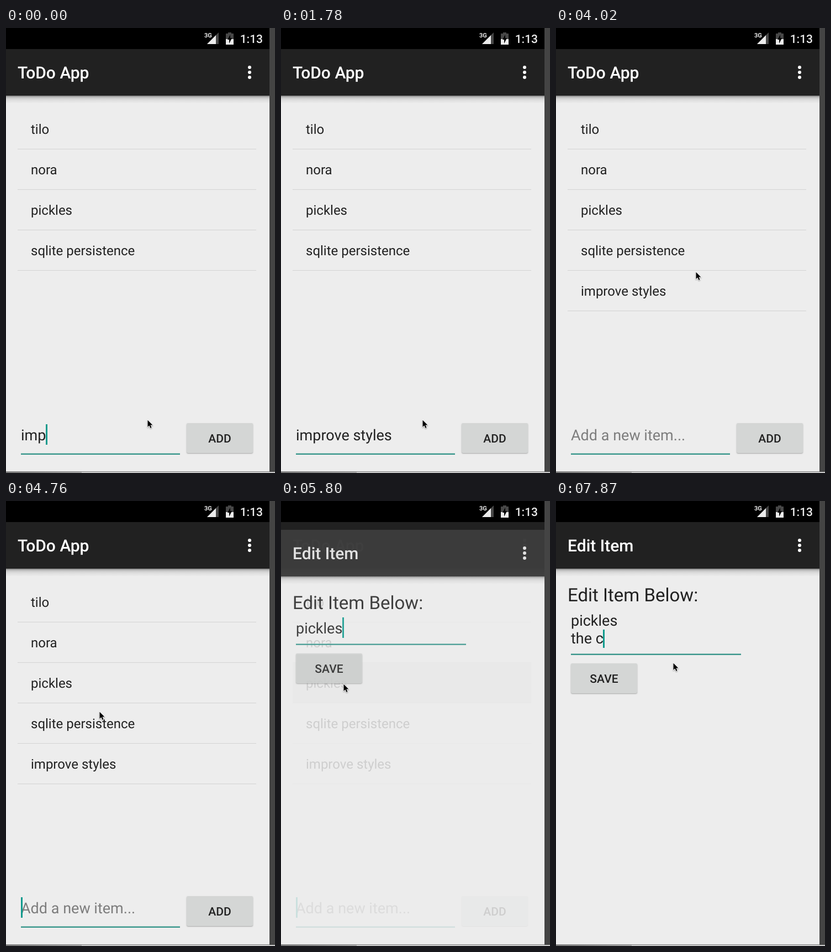
These frames come from a looping animation (487x803 px, 8 s). An HTML page with a canvas:

```html
<!DOCTYPE html>
<html lang="en">
<head>
<meta charset="utf-8">
<title>ToDo App</title>
<style>
html, body { margin: 0; width: 100%; height: 100%; overflow: hidden; background: #444; }
canvas { display: block; }
</style>
</head>
<body>
<canvas id="stage" width="487" height="803"></canvas>
<script>
const ctx = document.getElementById('stage').getContext('2d');
ctx.textRendering = 'geometricPrecision';

const LOOP = 8000, BEAT = 148.5;   // the screen refreshes once per beat
const W = 477, H = 800, ROW = 73, LINE = 32;
const BG = '#ededed', INK = '#212121', TEAL = '#0f9a8d';
const ITEMS = ['tilo', 'nora', 'pickles', 'sqlite persistence', 'improve styles'];

// Moments of the story, in beats
const PRESS = 16, ADDED = 17, TAP = 37, ENTER = 39, OPEN = 40, NEWLINE = 49;
const KEYS = [0, 3, 6, 9, ADDED, OPEN, NEWLINE, 51, 53];

// Pointer legs: start beat, end beat, destination
const HOME = [256, 706];
const LEGS = [
  [12, 15, 377, 734], [22, 25, 253, 439], [28, 32, 169, 379],
  [32, 36, 113, 329], [41, 44, 212, 291]
];

const ramp = (b, from, to) => Math.min(1, Math.max(0, (b - from) / (to - from)));
const mix = (a, b, u) => a + (b - a) * u;

function typedItem(b) {
  if (b >= ADDED) return '';
  return 'improve styles'.slice(0, Math.round(3 + 5 * ramp(b, 0, 3) + 6 * ramp(b, 5, 9)));
}

function editedItem(b) {
  const extra = b < NEWLINE ? 0 : 1 + Math.round(5 * ramp(b, 50, 53));
  return 'pickles\nthe c'.slice(0, 7 + extra).split('\n');
}

// The caret blinks anew after every key press.
function caretOn(b) {
  const last = Math.max(...KEYS.filter(k => k <= b));
  return Math.floor((b - last + 0.7) * 0.3) % 2 === 0;
}

function pointerAt(b) {
  return LEGS.reduce(([x, y], [from, to, toX, toY]) => {
    const u = ramp(b, from, to);
    return [mix(x, toX, u), mix(y, toY, u)];
  }, HOME).map(Math.round);
}

function rect(x, y, w, h, fill) {
  ctx.fillStyle = fill;
  ctx.fillRect(x, y, w, h);
}

function setFont(size, weight = 400) {
  ctx.font = `${weight} ${size}px Roboto, "Noto Sans", sans-serif`;
}

function text(str, x, y, size, { weight = 400, fill = INK, align = 'left' } = {}) {
  setFont(size, weight);
  ctx.textAlign = align;
  ctx.fillStyle = fill;
  ctx.fillText(str, x, y);
}

function poly(points, fill) {
  ctx.beginPath();
  points.forEach(([x, y]) => ctx.lineTo(x, y));
  ctx.closePath();
  ctx.fillStyle = fill;
  ctx.fill();
}

function disc(x, y, r, fill) {
  ctx.beginPath();
  ctx.arc(x, y, r, 0, Math.PI * 2);
  ctx.fillStyle = fill;
  ctx.fill();
}

function clipped(x, y, w, h, paint) {
  ctx.save();
  ctx.beginPath();
  ctx.rect(x, y, w, h);
  ctx.clip();
  paint();
  ctx.restore();
}

function caret(str, y, h) {
  setFont(27);
  rect(Math.floor(27 + ctx.measureText(str).width), y, 3, h, TEAL);
}

function underline(y, w) {
  rect(27, y, w, 1, '#9cc6c1');
  rect(27, y + 1, w, 2, '#3b978d');
}

function button(label, x, y, pressed) {
  ctx.save();
  ctx.shadowColor = `rgba(0,0,0,${pressed ? 0.4 : 0.3})`;
  ctx.shadowBlur = pressed ? 5 : 2;
  ctx.shadowOffsetY = pressed ? 2 : 1;
  ctx.beginPath();
  ctx.roundRect(x, y, 120, 54, 3);
  ctx.fillStyle = pressed ? '#cbcccc' : '#d4d6d5';
  ctx.fill();
  ctx.restore();
  text(label, x + 60, y + 35, 21, { weight: 500, align: 'center' });
}

function appBar(title) {
  const shade = ctx.createLinearGradient(0, 122, 0, 135);
  [0.5, 0.22, 0.12, 0.07, 0.04, 0.02].forEach((a, i) =>
    shade.addColorStop(i / 5, `rgba(0,0,0,${a})`));
  rect(0, 122, W, 13, shade);
  rect(0, 38, W, 84, INK);
  text(title, 21, 91, 30, { weight: 500, fill: '#fff' });
  [71, 80, 89].forEach(y => disc(441, y, 3, '#fff'));
}

function rowRipple(b) {
  if (b < TAP) return;
  const u = ramp(b, TAP - 0.7, ENTER);
  const x = mix(113, 237, 1 - (1 - u) ** 2);
  clipped(21, 292, 432, 72, () => {
    rect(21, 292, 432, 72, '#e3e3e3');
    disc(x, 328, 308 * u, '#d9d9d9');
  });
}

function listScreen(b) {
  rect(0, 38, W, H - 38, BG);
  rowRipple(b);
  ITEMS.slice(0, b < ADDED ? 4 : 5).forEach((item, i) => {
    text(item, 45, 191 + i * ROW, 24);
    rect(21, 218 + i * ROW, 432, 1, '#d3d3d3');
  });
  const typed = typedItem(b);
  text(typed || 'Add a new item...', 27, 744, 27, { fill: typed ? INK : '#7d7d7d' });
  if (caretOn(b)) caret(typed, 715, 37);
  underline(767, 288);
  button('ADD', 327, 713, b === PRESS);
  appBar('ToDo App');
}

function editScreen(b) {
  rect(0, 38, W, H - 38, BG);
  text('Edit Item Below:', 21, 181, 33);
  const lines = editedItem(b), last = lines.length - 1, extra = last * LINE;
  lines.forEach((line, i) => text(line, 27, 225 + i * LINE, 27));
  if (caretOn(b)) caret(lines[last], last ? 232 : 196, last ? 33 : 37);
  underline(243 + extra, 308);
  button('SAVE', 27, 261 + extra, false);
  appBar('Edit Item');
}

function statusBar() {
  const lit = '#ececec', dim = '#474747';
  rect(0, 0, W, 38, '#000');
  text('3G', 359, 17, 11, { weight: 700, fill: lit });
  const signal = [[364, 29], [385, 29], [385, 8]];
  poly(signal, dim);
  clipped(360, 0, 20, 38, () => poly(signal, lit));
  rect(402, 8, 6, 3, dim);
  rect(398, 10, 14, 10, dim);
  rect(398, 20, 14, 10, lit);
  poly([[406, 12], [401, 21], [404, 21], [404, 28], [409, 18], [406, 18]], '#000');
  text('1:13', 465, 27, 21, { weight: 500, fill: lit, align: 'right' });
}

function surround() {
  rect(W, 0, 10, 803, '#444');
  rect(0, 800, W, 1, '#858585');
  rect(0, 801, 487, 2, '#cbcbcb');
  const edge = ctx.createLinearGradient(0, 0, 137, 0);
  edge.addColorStop(0, '#777');
  edge.addColorStop(1, '#a6a6a6');
  rect(0, 801, 137, 2, edge);
}

function pointer(b) {
  const [x, y] = pointerAt(b);
  const arrow = [[0, 0], [0, 12.5], [2.9, 9.8], [5, 14.4], [7, 13.5], [5, 9.1], [9, 9.1]];
  ctx.save();
  ctx.translate(x + 0.5, y + 1.5);
  ctx.lineJoin = 'round';
  ctx.lineWidth = 1.8;
  ctx.strokeStyle = '#fff';
  ctx.shadowColor = 'rgba(0,0,0,.3)';
  ctx.shadowBlur = 2;
  ctx.shadowOffsetY = 1;
  poly(arrow, '#000');
  ctx.stroke();
  ctx.shadowColor = 'transparent';
  poly(arrow, '#000');
  ctx.restore();
}

function draw(t) {
  const b = Math.floor((t + 8) / BEAT);
  if (b < OPEN) listScreen(b);
  if (b >= ENTER) {
    clipped(0, 38, W, H - 38, () => {
      if (b < OPEN) {
        ctx.globalAlpha = 0.85;
        ctx.translate(0, 14);
      }
      editScreen(b);
    });
  }
  statusBar();
  surround();
  pointer(b);
}

const start = performance.now();
function frame() {
  draw((performance.now() - start) % LOOP);
  requestAnimationFrame(frame);
}
frame();
</script>
</body>
</html>
```
